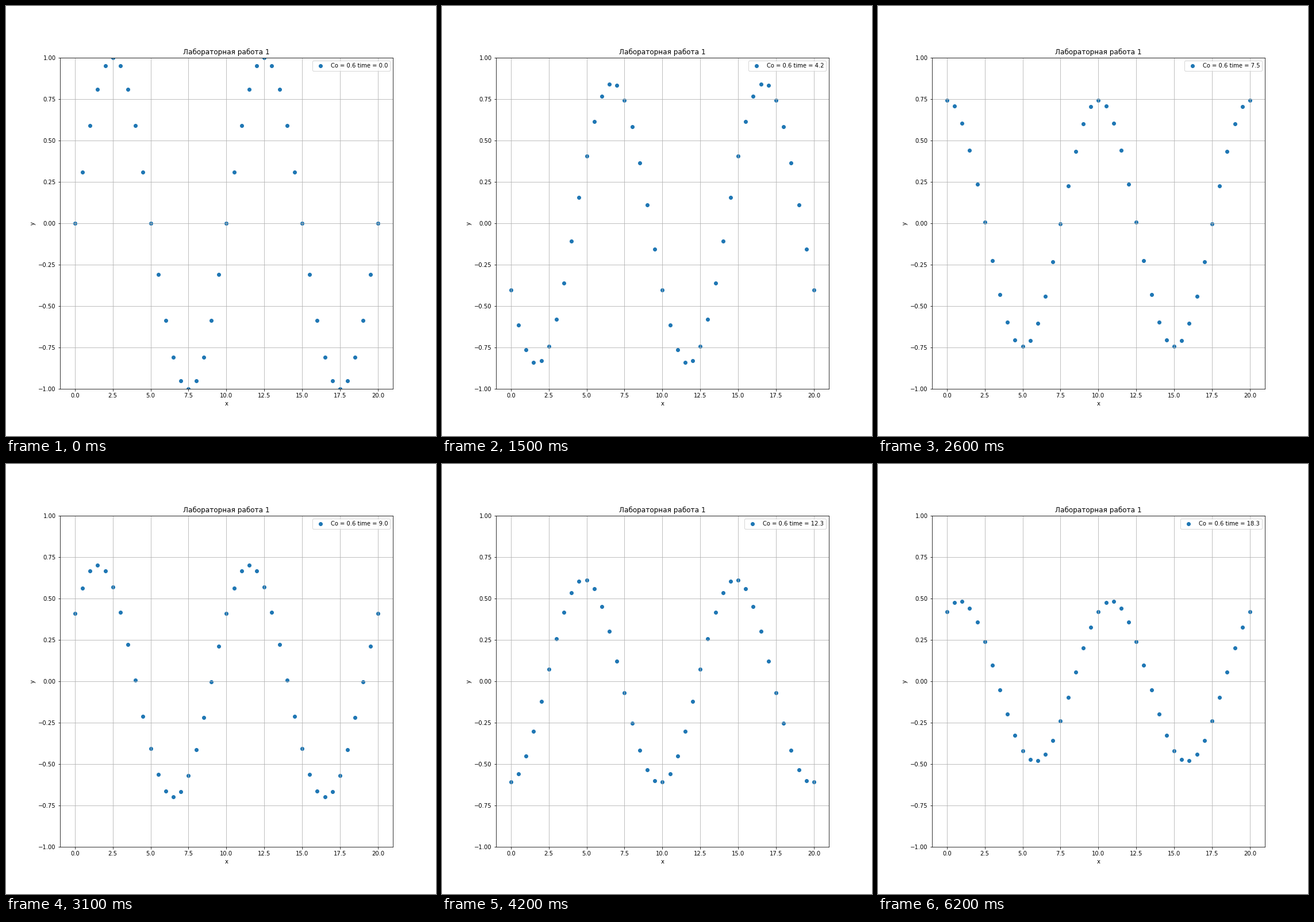
A matplotlib script for the animation above (6300 ms loop, 748x748 px).

```python
import numpy as np
import matplotlib.pyplot as plt
from matplotlib.animation import FuncAnimation

DPI = 72
SIDE = 748.001 / DPI  # tiny surplus guards against rounding down a pixel
FRAMES, INTERVAL = 63, 100

COURANT = 0.6
DX = 0.5
DT = COURANT * DX
WAVE = 2 * np.pi / 10

x = np.arange(0, 20 + DX / 2, DX)
# Growth of one Fourier mode over one step of the upwind scheme
gain = 1 - COURANT + COURANT * np.exp(-1j * WAVE * DX)


def solution(step):
    return (gain ** step * np.exp(1j * WAVE * x)).imag


def caption(step):
    return f"Co = {COURANT} time = {step * DT:.1f}"


plt.rcParams["font.family"] = "DejaVu Sans"
fig, ax = plt.subplots(figsize=(SIDE, SIDE), dpi=DPI)
dots = ax.scatter(x, solution(0), label=caption(0))
ax.set(xlim=(-1, 21), ylim=(-1, 1), xlabel="x", ylabel="y",
       title="Лабораторная работа 1")
ax.grid()
label = ax.legend(loc="upper right").get_texts()[0]


def update(frame):
    step = max(frame - 1, 0)  # the initial state is held for two frames
    dots.set_offsets(np.column_stack([x, solution(step)]))
    label.set_text(caption(step))
    return dots, label


anim = FuncAnimation(fig, update, frames=FRAMES, interval=INTERVAL,
                     repeat=True, repeat_delay=0, blit=False)
plt.show()
```
